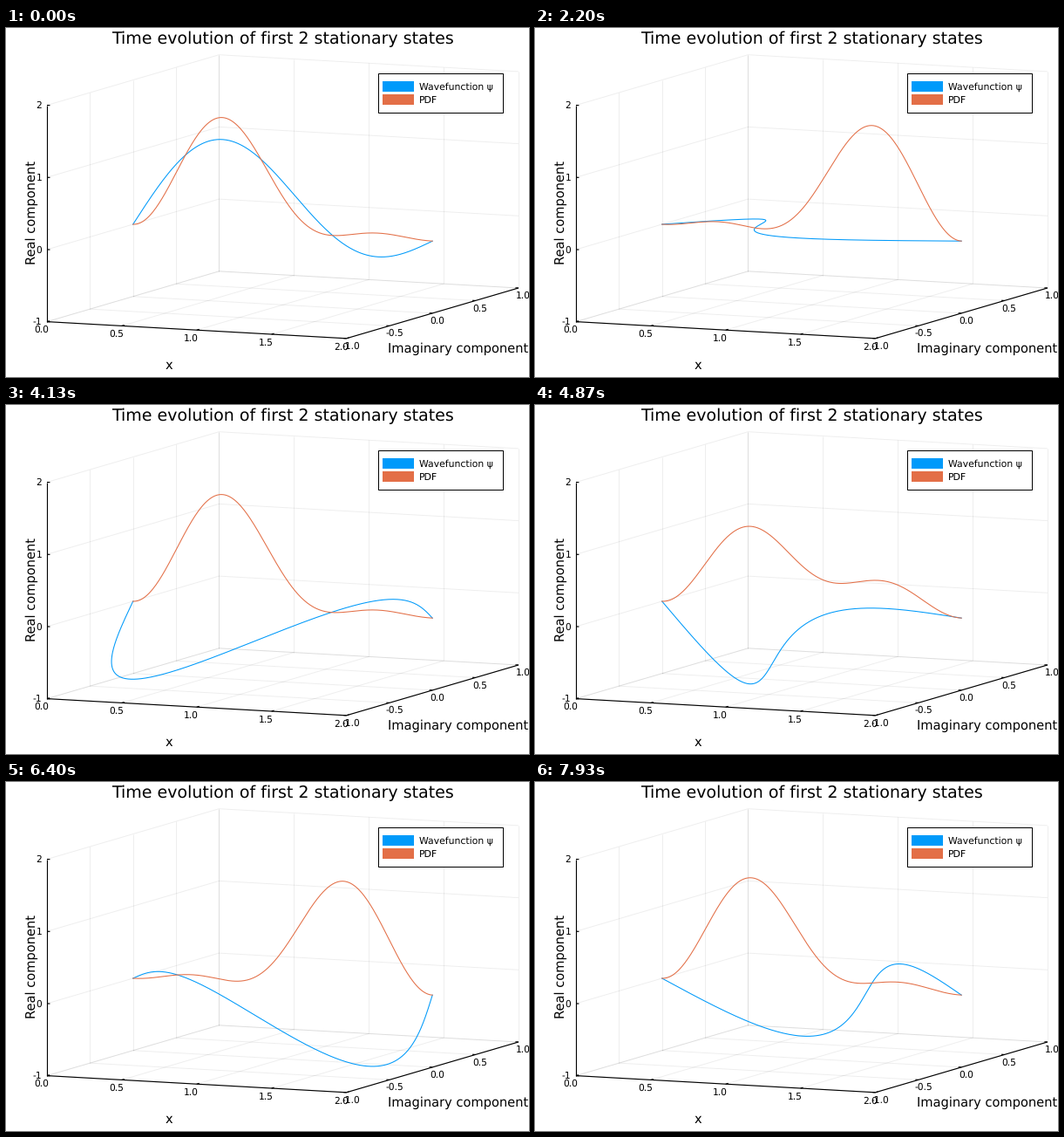
These frames come from a looping animation (600x400 px, 8 s). A matplotlib script:

```python
import numpy as np
import matplotlib.pyplot as plt
from matplotlib.animation import FuncAnimation
from matplotlib.collections import LineCollection
from matplotlib.patches import Rectangle

W, H, DPI = 600, 400, 100
STEPS, SUB, LOOP = 120, 3, 8000   # each step is held for SUB drawn frames
BLUE, ORANGE = "#009afa", "#e36f47"
PX = 72 / DPI                     # one pixel in points
PHASE = 0.10157 / 3               # ground-state phase per step

plt.rcParams["font.family"] = "DejaVu Sans"
plt.rcParams["text.hinting"] = "none"

fig = plt.figure(figsize=(W / DPI, H / DPI), dpi=DPI, facecolor="white")
ax = fig.add_axes([0, 0, 1, 1])
ax.set_xlim(0, W)
ax.set_ylim(H, 0)
ax.axis("off")


def project(x, im, re):
    """Orthographic view: (x, imaginary, real) to stage pixels."""
    return (145.7 + 171.75 * x + 98.7 * im,
            225.0 + 9.6 * x - 28.9 * im - 82.7 * re)


def draw_lines(pairs, width, **style):
    lines = [[project(*a), project(*b)] for a, b in pairs]
    ax.add_collection(LineCollection(lines, linewidths=width * PX, **style),
                      autolim=False)


def label(x, y, text, size, ha="center", **style):
    ax.text(x, y, text, fontsize=size * PX, ha=ha, va="baseline",
            color="black", **style)


def draw_grid():
    pairs = []
    for x in np.linspace(0, 2, 5):
        pairs += [((x, -1, -1), (x, 1, -1)), ((x, 1, -1), (x, 1, 2))]
    for im in np.linspace(-1, 1, 5):
        pairs += [((0, im, -1), (2, im, -1)), ((0, im, -1), (0, im, 2))]
    for re in range(-1, 3):
        pairs += [((0, -1, re), (0, 1, re)), ((0, 1, re), (2, 1, re))]
    draw_lines(pairs, 1, colors="black", alpha=0.065, zorder=1)


def draw_axes():
    pairs = [((0, -1, -1), (2, -1, -1)),
             ((2, -1, -1), (2, 1, -1)),
             ((0, -1, -1), (0, -1, 2))]
    for x in np.linspace(0, 2, 5):
        pairs.append(((x, -1, -1), (x, -0.97, -1)))
        px, py = project(x, -1, -1)
        label(px - 6.3, py + 12.6, f"{x:.1f}", 10.67)
    for im in np.linspace(-1, 1, 5):
        pairs.append(((2, im, -1), (1.98, im, -1)))
        px, py = project(2, im, -1)
        label(px + 5.6, py + 11.9, f"{im:.1f}", 10.67)
    for re in range(-1, 3):
        pairs.append(((0, -1, re), (0.02, -1, re)))
        px, py = project(0, -1, re)
        label(41.4, py + 3.6, str(re), 10.67, ha="right")
    draw_lines(pairs, 1.15, colors="black", zorder=2)


def draw_legend():
    ax.add_patch(Rectangle((426.6, 51.6), 143, 45, fc="white", ec="black",
                           lw=PX, zorder=5))
    for y, color, text in ((60.5, BLUE, "Wavefunction ψ"),
                           (75.5, ORANGE, "PDF")):
        ax.add_patch(Rectangle((432.4, y), 36, 12, fc=color, ec="none",
                               zorder=6))
        label(473.9, y + 10, text, 10.85, ha="left", zorder=6)


draw_grid()
draw_axes()
draw_legend()
label(317.5, 17.9, "Time evolution of first 2 stationary states", 19)
label(187.3, 390.6, "x", 14.67)
label(438.4, 371.6, "Imaginary component", 14.67, ha="left")
label(33.5, 212, "Real component", 14.67, rotation=90,
      rotation_mode="anchor")

xs = np.linspace(0, 2, 300)
state1, state2 = np.sin(np.pi * xs / 2), np.sin(np.pi * xs)
wave, = ax.plot([], [], color=BLUE, lw=1.05 * PX, zorder=3)
density, = ax.plot([], [], color=ORANGE, lw=1.05 * PX, zorder=4)


def update(i):
    phi = PHASE * ((i + 1) // SUB % STEPS)
    psi = (state1 * np.exp(-1j * phi) + state2 * np.exp(-4j * phi)) / np.sqrt(2)
    wave.set_data(*project(xs, psi.imag, psi.real))
    density.set_data(*project(xs, 0, np.abs(psi) ** 2))
    return wave, density


anim = FuncAnimation(fig, update, frames=STEPS * SUB,
                     interval=LOOP / (STEPS * SUB),
                     repeat=True, repeat_delay=0)
plt.show()
```
